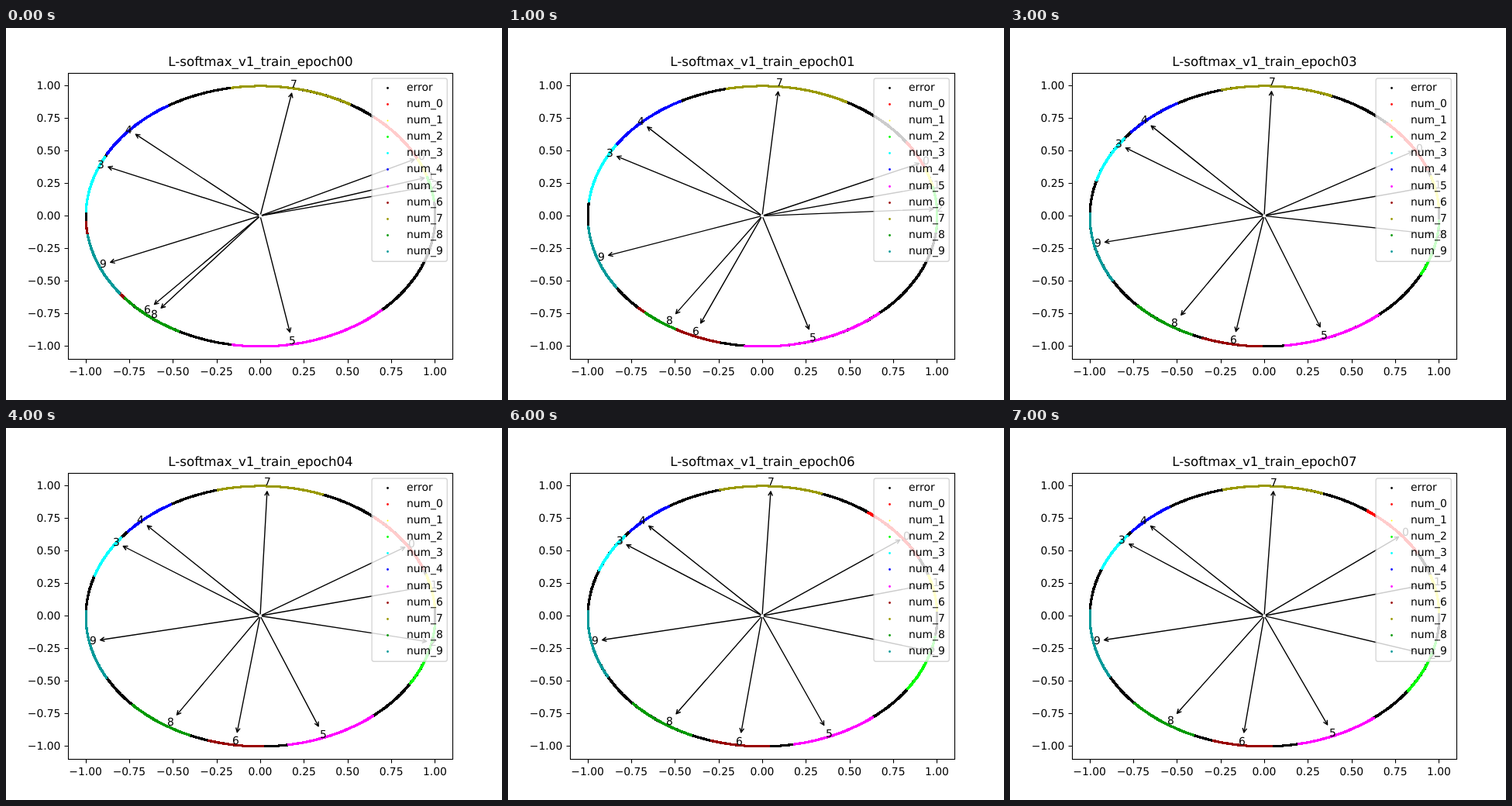
Animation of 640 by 480 pixels, one loop 8 s. Source, as an HTML page:

```html
<!DOCTYPE html>
<html lang="en">
<head>
<meta charset="utf-8">
<title>Training epochs</title>
<style>
html, body { margin: 0; width: 100%; height: 100%; overflow: hidden; background: #fff; }
svg { display: block; width: 640px; height: 480px; }
text { font: 13.89px "DejaVu Sans", sans-serif; text-rendering: geometricPrecision; }
.title { font-size: 16.67px; }
.mid { text-anchor: middle; }
.end { text-anchor: end; }
.axis { fill: none; stroke: #000; stroke-width: 1.11; }
.arrow { fill: none; stroke: #000; stroke-width: 1.39; stroke-linejoin: round; }
</style>
</head>
<body>
<svg id="stage" viewBox="0 0 640 480"></svg>
<script>
const stage = document.getElementById('stage');
const CX = 328, CY = 242.4, RX = 225.45, RY = 168;
const EPOCHS = 8, STEP = 1000;

// Angles in degrees at epochs 0, 1, 2, 4 and 7:
// dir = class direction, from/to = ends of the class's arc.
const classes = [
  { color: '#ff0000', dir: [25.4, 23.3, 25, 31.9, 37.8], from: [26, 21, 20, 21.5, 29], to: [49.6, 34.4, 38, 49.5, 54.2] },
  { color: '#ffff00', dir: [16.2, 12, 12, 12.2, 13.5], from: [17, 12.9, 5, 4, 2], to: [26, 21.5, 16.5, 18.5, 18] },
  { color: '#00ff00', dir: [12, 1.7, -3.4, -13.3, -19.3], from: [7, -6.7, -18, -31.1, -34.9], to: [17.5, 12.9, 2, -4, -11] },
  { color: '#00ffff', dir: [158.4, 153, 150.2, 147.5, 146.3], from: [153, 146.8, 144.3, 143, 141.8], to: [177.8, 173.4, 167.9, 161.8, 158.5] },
  { color: '#0000ff', dir: [140.5, 135.7, 135, 134.8, 135.1], from: [122.2, 118, 118, 121, 123], to: [151.5, 146.5, 140.9, 139.3, 139.3] },
  { color: '#ff00ff', dir: [279.4, 285.6, 287.4, 289.9, 291.8], from: [260.8, 264.1, 272.3, 279.2, 281.2], to: [313.8, 311.7, 312, 310, 308.7] },
  { color: '#990000', dir: [228.4, 246.4, 255.3, 260.7, 261.7], from: [182.6, 224.8, 243, 252.7, 253], to: [220, 255.6, 266.2, 270.8, 272.5] },
  { color: '#999900', dir: [80, 85.5, 88.3, 88.7, 87.9], from: [59.3, 61.4, 64.8, 69.2, 70.9], to: [99.7, 102, 103.6, 104.4, 103.9] },
  { color: '#009900', dir: [231.3, 236.5, 238, 237.7, 236.2], from: [219.1, 228, 223.7, 223, 222], to: [242, 240, 244.5, 245.9, 245.9] },
  { color: '#009999', dir: [203.5, 200, 195.6, 192.6, 192.6], from: [188.4, 184.6, 180.5, 177.8, 177.6], to: [216.2, 213, 212.4, 208.3, 207.5] }
];

// Place of each epoch among the five stored values
const place = [0, 1, 2, 2.65, 3, 3.4, 3.7, 4];

function at(values, epoch) {
  const p = place[epoch], i = Math.min(3, Math.floor(p));
  return values[i] + (values[i + 1] - values[i]) * (p - i);
}

function add(tag, attrs, content) {
  const el = document.createElementNS('http://www.w3.org/2000/svg', tag);
  for (const key in attrs) el.setAttribute(key, attrs[key]);
  if (content !== undefined) el.textContent = content;
  stage.appendChild(el);
  return el;
}

function point(deg) {
  const a = deg * Math.PI / 180;
  return [CX + RX * Math.cos(a), CY - RY * Math.sin(a)];
}

const snap = v => Math.floor(v + 0.5) + 0.5;
const fix = pts => pts.map(v => v.toFixed(2)).join(' ');

// A row of dense 3px dots, each on whole pixels
function dots(from, to) {
  let d = '';
  for (let a = from; a <= to; a += 0.2) {
    const [x, y] = point(a).map(v => snap(v) - 1.5);
    d += `M${x} ${y}h3v3h-3z`;
  }
  return d;
}

// Arrow from the centre to the padded box around a digit at (x, y)
function arrowPath(x, y) {
  const bx = x + 4.42, by = y - 4.2;
  const dx = bx - CX, dy = by - CY, len = Math.hypot(dx, dy);
  const ux = dx / len, uy = dy / len;
  const inside = Math.min(7.2 / Math.abs(ux), 9.55 / Math.abs(uy));
  const d = len - inside - 2;
  const tx = CX + ux * d, ty = CY + uy * d;
  const wing = s => fix([tx - ux * 5.56 - s * uy * 2.78, ty - uy * 5.56 + s * ux * 2.78]);
  return `M${fix([CX + ux * 2, CY + uy * 2])}L${fix([tx, ty])}` +
    `M${wing(1)}L${fix([tx, ty])}L${wing(-1)}`;
}

// Rings
add('rect', { width: 640, height: 480, fill: '#fff' });
add('path', { d: dots(0, 360) });
for (const c of classes) c.arc = add('path', { fill: c.color });

// Axes
add('rect', { class: 'axis', x: 80.5, y: 58.5, width: 496, height: 369 });
for (let i = -4; i <= 4; i++) {
  const v = i / 4, x = CX + RX * v, y = CY - RY * v;
  const label = (v < 0 ? '\u2212' : '') + Math.abs(v).toFixed(2);
  add('path', { class: 'axis', d: `M${snap(x)} 427.5V432.5M80.5 ${snap(y)}H75.5` });
  add('text', { class: 'mid', x, y: 448 }, label);
  add('text', { class: 'end', x: 70.3, y: Math.round(y + 4.6) }, label);
}
const title = add('text', { class: 'title mid', x: CX + 0.5, y: 49 });

// Directions
classes.forEach((c, i) => {
  c.arrow = add('path', { class: 'arrow' });
  c.label = add('text', {}, i);
});

// Legend
add('rect', {
  x: 472.1, y: 65, width: 97.2, height: 236.3, rx: 2.8,
  fill: '#fff', stroke: '#ccc', 'stroke-width': 1.39, opacity: 0.8
});
['#000', ...classes.map(c => c.color)].forEach((fill, i) => {
  const y = Math.round(80.9 + 21.1 * i);
  add('circle', { cx: 492.5, cy: y - 3.5, r: i === 2 ? 1 : 1.4, fill });
  add('text', { x: 517, y }, i ? 'num_' + (i - 1) : 'error');
});

function draw(epoch) {
  title.textContent = 'L-softmax_v1_train_epoch0' + epoch;
  for (const c of classes) {
    const [x, y] = point(at(c.dir, epoch));
    c.arc.setAttribute('d', dots(at(c.from, epoch), at(c.to, epoch)));
    c.arrow.setAttribute('d', arrowPath(x, y));
    c.label.setAttribute('x', Math.round(x));
    c.label.setAttribute('y', Math.round(y));
  }
}

let shown = 0;
draw(shown);
const start = performance.now();
function tick() {
  const epoch = Math.floor((performance.now() - start) / STEP) % EPOCHS;
  if (epoch !== shown) draw(shown = epoch);
  requestAnimationFrame(tick);
}
requestAnimationFrame(tick);
</script>
</body>
</html>
```
